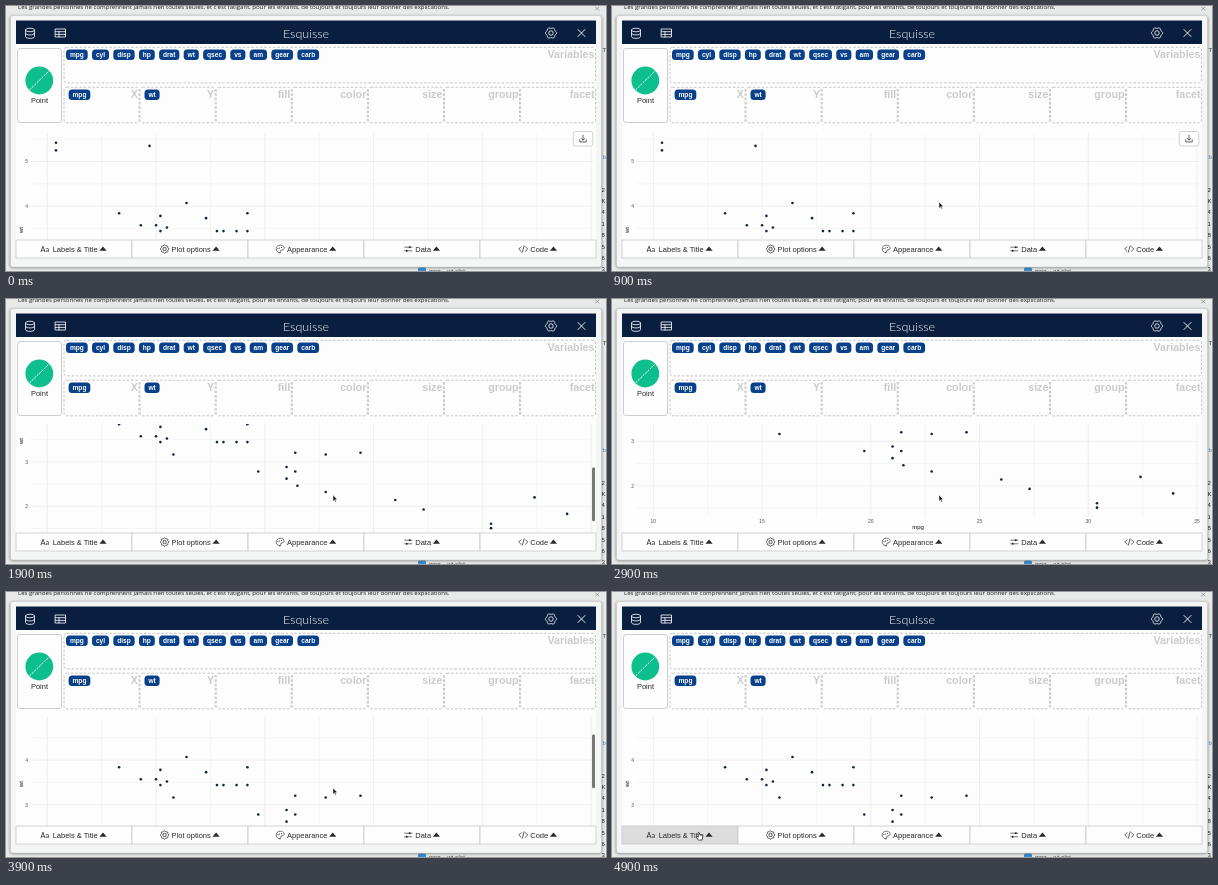
Animation of 600 by 265 pixels, one loop 5 s. Source, as an HTML page:

```html
<!DOCTYPE html>
<html lang="fr">
<head>
<meta charset="utf-8">
<title>Esquisse</title>
<style>
html, body { margin: 0; width: 100%; height: 100%; overflow: hidden; background: #e8eaea; }
svg { display: block; width: 600px; height: 265px; font-family: "Liberation Sans", Arial, sans-serif; }
.bold { font-weight: bold; }
.mid { text-anchor: middle; }
.end { text-anchor: end; }
.line { fill: none; stroke-linecap: round; stroke-linejoin: round; }
</style>
</head>
<body>
<svg viewBox="0 0 600 265">
  <defs>
    <clipPath id="view"><rect x="10" y="125" width="580" height="108.7"/></clipPath>
    <filter id="blur" x="-5%" y="-5%" width="110%" height="110%"><feGaussianBlur stdDeviation="1.8"/></filter>
  </defs>
  <g id="page"></g>
  <g id="modal"></g>
  <g clip-path="url(#view)">
    <g id="plot"></g>
    <rect id="thumb" x="586" y="125.5" width="3" height="54" rx="1.5" fill="#777"/>
  </g>
  <g id="footer"></g>
  <g id="cursor">
    <path id="arrow" d="M0 0V6.2L1.4 4.9L2.4 7.1L3.4 6.6L2.4 4.6H4.3Z" fill="#111" stroke="#fff" stroke-width=".5"/>
    <path id="hand" d="M-.9 -3.3Q-.2 -4 .4 -3.2L.8 -1L3 -.7L3.7 -.1V2L2.9 4.1H-.6L-2.7 1.1Q-2.4 .2 -1.5 .6L-.7 1.2Z" fill="#fff" stroke="#111" stroke-width=".7" stroke-linejoin="round"/>
  </g>
</svg>
<script>
const $ = id => document.getElementById(id);
const LOOP = 5000, STEP = 100;
const WHITE = "#fdfdfd", INK = "#2a2a2a", BORDER = "#c8c8c8";

function add(parent, tag, attrs, text) {
  const el = document.createElementNS("http://www.w3.org/2000/svg", tag);
  for (const k in attrs) el.setAttribute(k, attrs[k]);
  if (text) el.textContent = text;
  return parent.appendChild(el);
}
const rect = (g, x, y, width, height, fill, more) => add(g, "rect", { x, y, width, height, fill, ...more });
const label = (g, x, y, str, size, fill, more) => add(g, "text", { x, y, "font-size": size, fill, ...more }, str);
const line = (g, d, stroke, width = 0.8, more) => add(g, "path", { d, stroke, "stroke-width": width, class: "line", ...more });
const dot = (g, cx, cy, r, fill, more) => add(g, "circle", { cx, cy, r, fill, ...more });

function gear(g, x, y, r, teeth, color) {
  const rim = Array.from({ length: 48 }, (_, i) => {
    const a = i * Math.PI / 24, k = r * (0.91 + 0.09 * Math.cos(teeth * a));
    return `${x + k * Math.cos(a)} ${y + k * Math.sin(a)}`;
  });
  line(g, `M${rim.join("L")}Z`, color);
  dot(g, x, y, r * 0.4, "none", { stroke: color, "stroke-width": 0.8 });
}

function drawPage(g) {
  rect(g, 0, 0, 600, 265, "#e8eaea");
  label(g, 12, 3.2, "Les grandes personnes ne comprennent jamais rien toutes seules, et c'est fatigant, pour les enfants, de toujours et toujours leur donner des explications.",
    6.07, "#1c1c1c", { "font-family": "'Open Sans', sans-serif" });
  line(g, "M589.5 1L593 4M593 1L589.5 4", "#777", 0.6);
  label(g, 596.5, 46, "TF", 6, "#333");
  label(g, 596.5, 153, "b", 6, "#4a7fc0");
  [..."2K418563"].forEach((c, i) => label(g, 595.5, 185.5 + i * 11.4, c, 6, "#222"));
  rect(g, 412, 261.5, 8, 6, "#3d8fd1", { rx: 1.5 });
  label(g, 423, 267, "mpg ~ wt plot", 6, "#444");
  rect(g, 4, 10, 592, 252, "#000", { rx: 3, opacity: 0.4, filter: "url(#blur)" });
}

// Draws a pill sized to its name and returns its right edge.
function tag(g, x, y, name) {
  const box = rect(g, x, y, 0, 10.4, "#08418a", { rx: 3.5 });
  const width = label(g, x + 3.9, y + 7.4, name, 6.6, "#fff", { class: "bold" }).getComputedTextLength() + 7.8;
  box.setAttribute("width", width);
  return x + width;
}

function zone(g, x, y, width, name) {
  rect(g, x, y, width, 35.6, "none", { rx: 2.5, stroke: "#b8b8b8", "stroke-dasharray": "2.6 1.7", "stroke-width": 0.8 });
  label(g, x + width - 1, y + 11, name, 10.7, "#cbcbcb", { class: "bold end" });
}

function drawModal(g) {
  rect(g, 4.5, 9.5, 591, 251.5, "#f4f5f5", { rx: 2.5, stroke: "#c4c4c6", "stroke-width": 0.5 });
  rect(g, 10, 14, 580, 238, WHITE);
  rect(g, 10, 14.5, 580, 23.5, "#0a1f40");
  label(g, 300, 31.5, "Esquisse", 12.5, "#fff", { class: "mid", "font-family": "Lato, sans-serif", "font-weight": 300 });

  line(g, "M19.5 24V30.5C19.5 33 28.5 33 28.5 30.5V24M19.5 27.3C19.5 29.6 28.5 29.6 28.5 27.3", "#fff");
  add(g, "ellipse", { cx: 24, cy: 24, rx: 4.5, ry: 1.8, fill: "none", stroke: "#fff", "stroke-width": 0.8 });
  line(g, "M49.5 23H59.5V31H49.5ZM49.5 25.7H59.5M49.5 28.4H59.5M53 25.7V31", "#fff");
  gear(g, 545, 27, 5.6, 6, "#fff");
  line(g, "M572 23.5L579 30.5M579 23.5L572 30.5", "#fff", 0.9);

  rect(g, 11.5, 42.5, 44, 74, WHITE, { rx: 2.5, stroke: BORDER, "stroke-width": 0.9 });
  dot(g, 33.3, 74.5, 13.9, "#0dbf8c");
  line(g, "M24 83.5L43 65", "#fff", 1, { "stroke-dasharray": "1.4 1.9" });
  label(g, 33.5, 97.3, "Point", 7.5, INK, { class: "mid" });

  zone(g, 58, 41.3, 531.5, "Variables");
  ["X", "Y", "fill", "color", "size", "group", "facet"].forEach((name, i) => zone(g, 58 + i * 76.1, 81.2, 75, name));

  let x = 60;
  for (const name of ["mpg", "cyl", "disp", "hp", "drat", "wt", "qsec", "vs", "am", "gear", "carb"])
    x = tag(g, x, 43.6, name) + 4.3;
  tag(g, 62.6, 83.6, "mpg");
  tag(g, 138.5, 83.6, "wt");
}

// mtcars: each weight, followed by the mpg of the cars that have it.
const cars = [[5.42, 10.4], [5.35, 14.7], [5.25, 10.4], [4.07, 16.4], [3.84, 13.3, 19.2], [3.78, 15.2], [3.73, 17.3],
  [3.57, 14.3, 15], [3.52, 15.5], [3.44, 15.2, 17.8, 18.1, 18.7, 19.2], [3.2, 21.4, 24.4], [3.16, 15.8, 22.8], [2.88, 21],
  [2.78, 19.7, 21.4], [2.62, 21], [2.46, 21.5], [2.32, 22.8], [2.2, 32.4], [2.14, 26], [1.93, 27.3], [1.83, 33.9],
  [1.61, 30.4], [1.51, 30.4]];
const px = mpg => 41.3 + (mpg - 10) * 21.75;
const py = wt => 155.5 + (5 - wt) * 44.6;

function drawPlot(g) {
  const left = px(9.225), right = px(35.075), top = py(5.62), bottom = py(1.317);
  for (let v = 10; v <= 35; v += 2.5) {
    line(g, `M${px(v)} ${top}V${bottom}`, "#ebebeb", v % 5 ? 0.4 : 0.8);
    if (v % 5 === 0) label(g, px(v), 326, v, 4.9, "#4d4d4d", { class: "mid" });
  }
  for (let v = 1.5; v <= 5.5; v += 0.5) {
    line(g, `M${left} ${py(v)}H${right}`, "#ebebeb", v % 1 ? 0.4 : 0.8);
    if (v % 1 === 0) label(g, 22, py(v) + 1.8, v, 4.9, "#4d4d4d", { class: "end" });
  }
  label(g, 306, 332, "mpg", 6, "#111", { class: "mid" });
  label(g, 0, 0, "wt", 6, "#111", { class: "mid", transform: "translate(17 224) rotate(-90)" });
  for (const [wt, ...mpgs] of cars)
    for (const mpg of mpgs) dot(g, px(mpg), py(wt), 1.3, "#112446");
  rect(g, 567.3, 125.5, 19.5, 14.5, WHITE, { rx: 2, stroke: BORDER, "stroke-width": 0.8 });
  line(g, "M577 129.3V134M575.2 132.4L577 134.2L578.8 132.4M573.8 133.8V136H580.2V133.8", INK, 0.7);
}

// Icons are drawn around their own centre.
const icons = {
  "Labels & Title": g => label(g, -5.2, 2.5, "Aa", 7.3, INK, { "font-family": "Lato, sans-serif" }),
  "Plot options": g => gear(g, 0, 0, 4.2, 8, INK),
  "Appearance": g => {
    line(g, "M0 3.8C-5.4 3.5 -5 -3.8 .3 -3.8C5 -3.8 5.2 1 2 .9C-.3 .8 1.6 3.7 0 3.8Z", INK, 0.65);
    for (const x of [-2, -0.5, 1.4]) dot(g, x, -1.6 + Math.abs(x - 1) * 0.4, 0.55, INK);
  },
  "Data": g => {
    line(g, "M-3.6 -1.8H3.6M-3.6 1.8H3.6", INK, 0.65);
    for (const s of [-1, 1]) dot(g, -1.5 * s, 1.8 * s, 1, INK);
  },
  "Code": g => line(g, "M-2.2 -2.3L-4.5 0L-2.2 2.3M2.2 -2.3L4.5 0L2.2 2.3M.9 -3.2L-.9 3.2", INK, 0.75)
};

function drawFooter(g) {
  return Object.keys(icons).map((name, i) => {
    const x = 10 + i * 116, mid = x + 59.2;
    const cell = rect(g, x, 234, 116, 18, WHITE, { stroke: BORDER, "stroke-width": 0.8 });
    const half = label(g, mid, 245.7, name, 7.5, INK, { class: "mid" }).getComputedTextLength() / 2;
    icons[name](add(g, "g", { transform: `translate(${mid - half - 7} 243)` }));
    add(g, "path", { d: "M-3.6 1.8L0 -2.4L3.6 1.8Z", fill: INK, transform: `translate(${mid + half + 5.3} 243)` });
    return cell;
  });
}

const clamp = v => Math.min(1, Math.max(0, v));
const span = (t, from, to) => clamp((t - from) / (to - from));
const easeOut = (p, power) => 1 - (1 - p) ** power;
const smooth = p => p * p * (3 - 2 * p);
const pulse = (t, from, to) => span(t, from, from + 100) * (1 - span(t, to, to + 300));

const scrollAt = t => 102.5 * easeOut(span(t, 1190, 2190), 1.3) - 70.5 * easeOut(span(t, 3140, 3900), 1.3);
const thumbAt = t => pulse(t, 1100, 2500) + pulse(t, 3100, 4200);

function cursorAt(t) {
  const enter = 1 - easeOut(span(t, 400, 900), 2), leave = smooth(span(t, 4300, 4900));
  return [327 - 18 * enter - 240 * leave, 196 + 50 * enter + 48 * leave];
}

drawPage($("page"));
drawModal($("modal"));
drawPlot($("plot"));
const cells = drawFooter($("footer"));

function render(time) {
  const t = Math.floor(time % LOOP / STEP) * STEP;
  const scroll = scrollAt(t), [x, y] = cursorAt(t);
  const shown = t >= 400, over = shown && y > 234;
  $("plot").setAttribute("transform", `translate(0 ${-scroll})`);
  $("thumb").setAttribute("transform", `translate(0 ${scroll * 0.52})`);
  $("thumb").setAttribute("opacity", thumbAt(t));
  $("cursor").setAttribute("transform", `translate(${x} ${y})`);
  $("cursor").setAttribute("visibility", shown ? "visible" : "hidden");
  $("arrow").setAttribute("opacity", over ? 0 : 1);
  $("hand").setAttribute("opacity", over ? 1 : 0);
  cells.forEach((cell, i) =>
    cell.setAttribute("fill", over && Math.floor((x - 10) / 116) === i ? "#dcdcdc" : WHITE));
}

const start = performance.now();
function tick() {
  render(performance.now() - start);
  requestAnimationFrame(tick);
}
tick();
</script>
</body>
</html>
```
